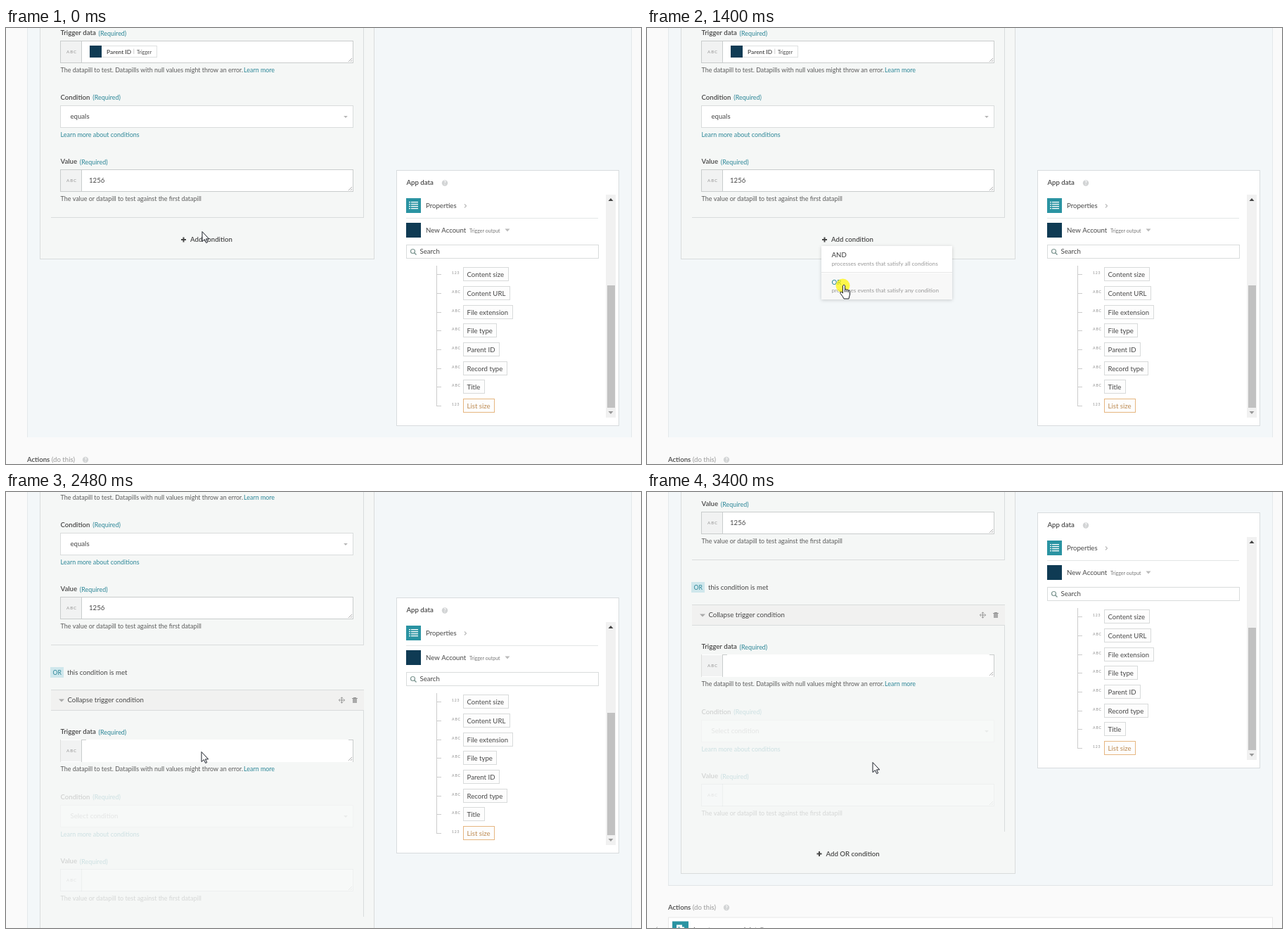
Write an HTML page with a canvas that moves like this. It is 903 px wide and 620 px high and loops after 3950 ms.

```html
<!DOCTYPE html>
<html lang="en">
<head>
<meta charset="utf-8">
<title>Add a trigger condition</title>
<style>
html, body { margin: 0; width: 100%; height: 100%; overflow: hidden; background: #fafafa; }
canvas { display: block; }
</style>
</head>
<body>
<canvas id="stage" width="903" height="620"></canvas>
<script>
const ctx = document.getElementById('stage').getContext('2d', { alpha: false });
const LOOP = 3950, SUBMIT = 1560, MENU_OPEN = 610;
const BODY = 9.65, SMALL = 8.93, TINY = 7;
const INK = '#484848', GRAY = '#999', TEAL = '#2d8798', LINE = '#d9dcdc', NAVY = '#0f3b54';

// [time, kind, x, y]
const cursorSteps = [
  [0, 'arrow', 278.5, 289], [70, 'arrow', 278.5, 288],
  [210, 'hand', 262, 298], [290, 'hand', 262, 290], [440, 'hand', 269, 290],
  [690, 'hand', 269, 292], [770, 'hand', 269, 297], [850, 'hand', 270, 303],
  [920, 'hand', 270, 308], [1010, 'hand', 270, 314], [1090, 'hand', 271, 319],
  [1160, 'hand', 272, 331], [1240, 'hand', 273, 344], [1320, 'hand', 274, 356],
  [1400, 'hand', 274, 364],
  [SUBMIT, 'arrow', 277.5, 364], [2090, 'arrow', 277.5, 366], [2170, 'arrow', 277.5, 369],
  [3330, 'arrow', 304, 380], [3400, 'arrow', 320.5, 384]
];
// [time, offset]
const scrollSteps = [[0, 0], [2410, 16], [2480, 52], [2560, 88], [2640, 124], [2710, 155], [2790, 173]];

const arrowPath = new Path2D('M.5.5V14.6L3.9 11.6L6.2 16.5L8.2 15.6L6 10.9H10.2Z');
const handPath = new Path2D('M4.5 13V2.3Q6 .2 7.5 2.3V8Q9 6.8 10 8.3Q11.5 7.5 12.3 9Q14.3 8.6 14.5 10.5V15Q13.5 18 13 21H6Q4.5 17.5 1 13.5Q.3 11 2.5 11.2Z');
const fingerPath = new Path2D('M7.5 8V11.5M10 8.5V11.5M12.3 9V12');

const current = (steps, t) => steps.findLast(s => s[0] <= t);

function text(str, x, middle, { size = BODY, color = INK, weight = 400, spacing = 0 } = {}) {
  ctx.font = `${weight} ${size}px Lato, sans-serif`;
  ctx.letterSpacing = spacing + 'px';
  ctx.fillStyle = color;
  ctx.fillText(str, x, middle + size * .36);
  return ctx.measureText(str).width;
}

function rect(x, y, w, h, fill, stroke) {
  if (fill) { ctx.fillStyle = fill; ctx.fillRect(x, y, w, h); }
  if (stroke) { ctx.strokeStyle = stroke; ctx.lineWidth = 1; ctx.strokeRect(x + .5, y + .5, w - 1, h - 1); }
}

const hline = (x1, x2, y, color = LINE) => rect(x1, y, x2 - x1, 1, color);
const vline = (x, y1, y2, color = LINE) => rect(x, y1, 1, y2 - y1, color);

function polygon(points, color) {
  ctx.beginPath();
  points.forEach(([x, y]) => ctx.lineTo(x, y));
  ctx.fillStyle = color;
  ctx.fill();
}

function strokePath(path, color, width = 1) {
  ctx.strokeStyle = color;
  ctx.lineWidth = width;
  ctx.stroke(new Path2D(path));
}

function triangle(x, y, half, height, color) {
  polygon([[x - half, y - height / 2], [x + half, y - height / 2], [x, y + height / 2]], color);
}

function helpMark(x, y) {
  ctx.beginPath();
  ctx.arc(x, y, 4.2, 0, 7);
  ctx.fillStyle = '#d2d4d5';
  ctx.fill();
  text('?', x - 1.5, y, { size: TINY, weight: 700, color: '#fff' });
}

function label(title, y) {
  const w = text(title, 77.5, y, { weight: 600 });
  text('(Required)', 77.5 + w + 3.8, y + .5, { size: SMALL, color: TEAL });
}

const small = (str, x, y, color = '#5c5c5c') => text(str, x, y, { size: SMALL, color });
const typeTag = (str, x, y, size) => text(str, x, y, { size, weight: 700, color: '#aaa', spacing: size / 6 });

function textInput(y, focused) {
  rect(77, y, 417, 32, '#fff', focused ? null : '#c9cccc');
  rect(78, y + 1, 29, 30, '#f1f2f2');
  vline(107, y, y + 32, '#c9cccc');
  if (focused) {
    vline(77, y, y + 32, '#dedede');
    vline(493, y, y + 32, '#c9cccc');
    hline(107, 114, y, '#c9cccc');
    hline(487, 494, y, '#c9cccc');
  }
  typeTag('ABC', 86, y + 16, 6);
  strokePath(`M487 ${y + 30}L492 ${y + 25}M490 ${y + 30}L492 ${y + 28}`, '#999', .8);
}

function triggerField(dy, filled) {
  label('Trigger data', 7 + dy);
  textInput(18 + dy, !filled);
  if (filled) {
    rect(119, 25 + dy, 96, 17, '#fff', '#dfe1e1');
    rect(119, 25 + dy, 17, 17, NAVY);
    text('Parent ID', 143, 33.5 + dy, { size: 8.4, weight: 600 });
    text('|', 181, 33.5 + dy, { size: TINY, color: GRAY });
    text('Trigger', 186, 34 + dy, { size: TINY });
  }
  small('The datapill to test. Datapills with null values might throw an error.', 77.5, 60 + dy);
  small('Learn more', 338, 60 + dy, TEAL);
}

function conditionField(dy, value, color) {
  label('Condition', 98.5 + dy);
  rect(77, 110 + dy, 417, 32, '#fff', LINE);
  text(value, 91.5, 126 + dy, { color });
  triangle(483, 126.5 + dy, 2.8, 3, '#b5b5b5');
  small('Learn more about conditions', 77.5, 152 + dy, TEAL);
}

function valueField(dy, value) {
  label('Value', 190 + dy);
  textInput(201 + dy);
  text(value, 118, 217 + dy);
  small('The value or datapill to test against the first datapill', 77.5, 243 + dy);
}

function addButton(caption, x, y, underlined) {
  rect(x, y - 1, 7, 2, INK);
  rect(x + 2.5, y - 3.5, 2, 7, INK);
  const w = text(caption, x + 13, y, { weight: 600 });
  if (underlined) hline(x + 13, x + 13 + w, y + 4, INK);
}

function secondCondition() {
  rect(63, 301, 19, 15, '#cfe7ec');
  text('OR', 66.5, 308.5, { size: 8.6, color: TEAL });
  text('this condition is met', 87, 308.5);

  rect(64, 333, 445, 30, '#f1f1f0');
  hline(64, 509, 333);
  hline(64, 509, 362);
  triangle(79, 348.5, 4, 4, '#aaa');
  text('Collapse trigger condition', 87.5, 348);
  strokePath('M473.5 348H481.5M477.5 344V352M475.8 345.5L477.5 343.8L479.2 345.5M475.8 350.5L477.5 352.2L479.2 350.5M475 346.3L473.3 348L475 349.7M480 346.3L481.7 348L480 349.7', '#888', .8);
  rect(492, 345, 8, 1, '#999');
  rect(494, 344, 4, 1, '#999');
  rect(493, 346, 6, 6, '#aaa');

  vline(508, 363, 656);
  triggerField(386, false);
  ctx.save();
  ctx.globalAlpha *= .2;
  conditionField(387, 'Select condition', GRAY);
  valueField(387, '');
  ctx.restore();
  addButton('Add OR condition', 241.5, 687.5);
}

function dataPanel() {
  rect(555, 202, 317, 364, '#fff', '#d8dcde');
  text('App data', 569.5, 219.5, { weight: 600 });
  helpMark(624, 220.5);

  rect(569, 242, 21, 21, '#2a93a2');
  for (let y = 247; y <= 257; y += 3) {
    rect(573, y, 2, 1.3, '#fff');
    rect(576, y, 10, 1.3, '#fff');
  }
  text('Properties', 597, 253);
  strokePath('M652 250.5L654.5 253L652 255.5', '#bbb', 1.2);
  hline(569, 842, 270, '#e3e6e6');

  rect(569, 277, 21, 21, NAVY);
  text('New Account', 597, 287.5);
  text('Trigger output', 659, 288.5, { size: TINY, color: '#777' });
  triangle(713, 287.5, 3.5, 4, '#bbb');

  rect(569, 308, 274, 20, '#fff', LINE);
  ctx.beginPath();
  ctx.arc(578.5, 317.5, 3, 0, 7);
  ctx.strokeStyle = '#7d9691';
  ctx.lineWidth = 1.2;
  ctx.stroke();
  strokePath('M580.7 319.7L583.5 322.5', '#7d9691', 1.4);
  text('Search', 588.5, 318);

  const rows = ['Content size', 'Content URL', 'File extension', 'File type', 'Parent ID', 'Record type', 'Title', 'List size'];
  vline(612, 338, 538, '#ccc');
  rows.forEach((name, i) => {
    const y = Math.round(350.4 + i * 26.65), isList = i === 7;
    hline(612, 619, y, '#ccc');
    typeTag(i === 0 || isList ? '123' : 'ABC', 634, y - 1.5, 5.1);
    ctx.font = `400 ${BODY}px Lato, sans-serif`;
    ctx.letterSpacing = '0px';
    rect(650, y - 10, Math.round(ctx.measureText(name).width + 12), 20, '#fdfdfd', isList ? '#e6b680' : '#d8dada');
    text(name, 655.5, y + .5, { color: isList ? '#bd8a50' : INK });
  });

  rect(853, 237, 14, 317, '#f1f1f1');
  rect(855, 366, 11, 174, '#c1c1c1');
  triangle(860, 244, 3.5, -4, '#444');
  triangle(860, 547, 3.5, 4, '#999');
}

function menu(tip) {
  ctx.save();
  ctx.shadowColor = 'rgba(0,0,0,.18)';
  ctx.shadowBlur = 5;
  ctx.shadowOffsetY = 1;
  rect(248, 310, 186, 76, '#fff');
  ctx.restore();
  [['AND', 'all conditions'], ['OR', 'any condition']].forEach(([name, rest], i) => {
    const y = 310 + i * 38.5, hover = tip >= y && tip < y + 38;
    if (hover) rect(248, Math.round(y), 186, 37, '#f8f8f8');
    text(name, 262.5, y + 13, { weight: 500, color: hover ? TEAL : INK });
    text('processes events that satisfy ' + rest, 262.5, y + 25, { size: 8.15, color: GRAY });
  });
  hline(248, 434, 347, '#e6e6e6');
}

function actions(y, withStep) {
  const w = text('Actions', 30, y, { weight: 600 });
  text('(do this)', 30 + w + 2.5, y, { color: GRAY });
  helpMark(113, y + .5);
  if (!withStep) return;
  rect(30, y + 14, 860, 60, '#fff', '#e8e8e8');
  rect(36, y + 20, 23, 23, '#2a93a2');
  rect(42, y + 25, 8, 12, '#fff');
  rect(48, y + 28, 5, 9, '#fff');
  rect(44, y + 28, 3, 1, '#2a93a2');
  text('Insert new record details', 66, y + 32);
  strokePath(`M15 ${y + 28}L11.5 ${y + 31}L15 ${y + 34}`, '#aaa');
}

function drawCursor([, kind, x, y]) {
  const isHand = kind === 'hand', path = isHand ? handPath : arrowPath;
  ctx.save();
  ctx.translate(x, y);
  ctx.lineJoin = 'round';
  ctx.lineWidth = 1;
  ctx.fillStyle = '#fff';
  ctx.strokeStyle = '#1b2029';
  ctx.fill(path);
  ctx.stroke(path);
  if (isHand) ctx.stroke(fingerPath);
  ctx.restore();
}

function draw(t) {
  const cursor = current(cursorSteps, t);
  const [, kind, , tip] = cursor;
  const added = t >= SUBMIT;
  const areaEnd = added ? 733 : 582;

  rect(0, 0, 903, 620, '#fafafa');
  ctx.save();
  ctx.translate(0, -current(scrollSteps, t)[1]);

  rect(30, -10, 860, areaEnd + 10, '#f3f7f9');
  vline(30, 0, areaEnd, '#e4e8ea');
  vline(889, 0, areaEnd, '#e4e8ea');
  if (added) hline(30, 890, areaEnd - 1, '#e1e5e7');
  rect(48, -10, 476, added ? 726 : 339, '#f5f7f6', LINE);

  vline(508, 0, 270);
  hline(64, 509, 269);
  triggerField(0, true);
  conditionField(0, 'equals', INK);
  valueField(0, '1256');

  if (added) {
    ctx.save();
    if (t < 1630) ctx.globalAlpha = .6;
    secondCondition();
    ctx.restore();
  } else {
    addButton('Add condition', 249, 301, kind === 'hand' && tip < 307);
  }
  dataPanel();
  actions(added ? 763.5 : 613.5, added);

  if (!added && t >= MENU_OPEN) {
    ctx.save();
    if (t < 690) ctx.globalAlpha = .5;
    menu(tip);
    ctx.restore();
  }
  ctx.restore();

  if (t >= 1400 && !added) {
    ctx.beginPath();
    ctx.arc(278.5, 366.5, 10, 0, 7);
    ctx.fillStyle = 'rgba(255,245,0,.7)';
    ctx.fill();
  }
  drawCursor(cursor);
}

function tick() {
  draw(performance.now() % LOOP);
  requestAnimationFrame(tick);
}
tick();
</script>
</body>
</html>
```
